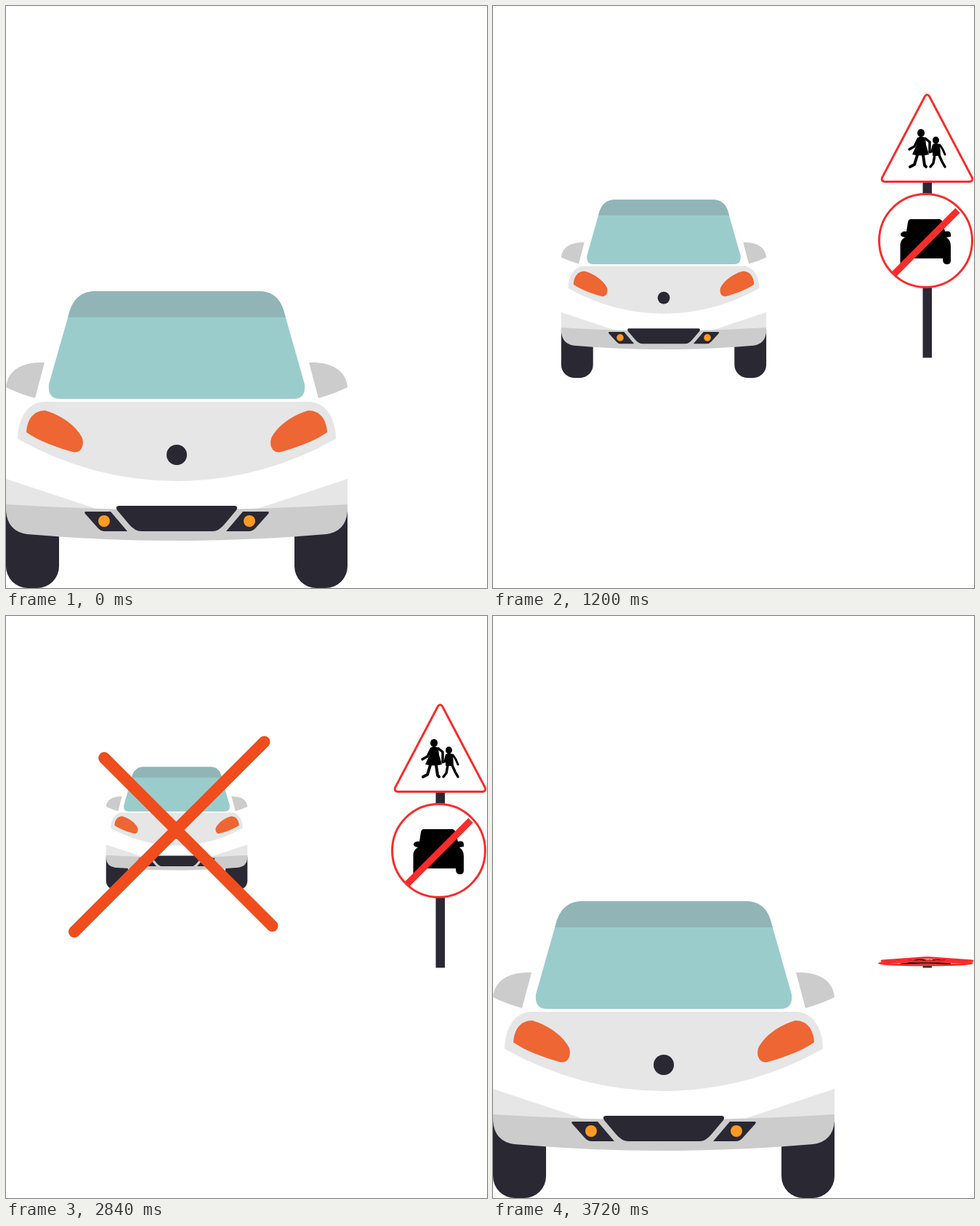
Write an HTML page that moves like this. It is 662 px wide and 800 px high and loops after 3760 ms.

```html
<!DOCTYPE html>
<html lang="en">
<head>
<meta charset="utf-8">
<title>No parking near the crossing</title>
<style>
  html, body { margin: 0; width: 100%; height: 100%; overflow: hidden; background: #fff; }
  svg { display: block; width: 100%; height: 100%; }
  .navy { fill: #292833; }
  .grey { fill: #ccc; }
  .pale { fill: #e6e6e6; }
  .glass { fill: #9bcccc; }
  .tint { fill: #91b5b7; }
  .lamp { fill: #ed6633; }
  .fog { fill: #ff9a22; }
  .limb { fill: none; stroke: #000; stroke-linecap: round; stroke-linejoin: round; }
  .rim { fill: #fff; stroke: #f92c2c; stroke-width: 3; vector-effect: non-scaling-stroke; }
  .cross { stroke: #ef4d1e; stroke-width: 16; stroke-linecap: round; }
</style>
</head>
<body>
<svg viewBox="0 0 662 800">
  <defs>
    <clipPath id="tintClip"><rect x="50" y="380" width="370" height="48"/></clipPath>
    <path id="screen" d="M121 392H350Q374 393 382 418L411 520Q413 540 396 540H74Q57 540 59 520L88 418Q97 393 121 392Z"/>
    <g id="side">
      <path class="navy" d="M0 690H73V770A30 30 0 0 1 43 800H30A30 30 0 0 1 0 770Z"/>
      <path class="grey" d="M0 524C2 502 20 489 53 490L40 539Q18 533 0 524Z"/>
      <path class="pale" d="M0 650L130 693H0Z"/>
    </g>
    <g id="lights">
      <path class="lamp" d="M28 586C29 568 38 556 54 556C78 563 97 578 105 594C108 605 103 614 94 613.500C70 607 45 598 28 586Z"/>
      <path class="navy" d="M110 695H144L167 722H136Q130 722 126 717L109 698Q107 695 110 695Z"/>
      <circle class="fog" cx="135" cy="708" r="8"/>
    </g>
  </defs>

  <g id="car">
    <use href="#side"/>
    <use href="#side" transform="matrix(-1 0 0 1 470 0)"/>
    <path class="grey" d="M0 685Q235 700 470 685V694Q468 722 441 726Q235 744 29 726Q2 722 0 694Z"/>
    <use href="#screen" class="glass"/>
    <use href="#screen" class="tint" clip-path="url(#tintClip)"/>
    <path class="pale" d="M52 544H418C442 545 454 570 454 595Q350 653 235 653T16 595C16 570 28 545 52 544Z"/>
    <use href="#lights"/>
    <use href="#lights" transform="matrix(-1 0 0 1 470 0)"/>
    <path class="navy" d="M155 687H315Q320 688 317 693L301 712Q293 722 284 722H187Q177 722 169 712L153 693Q150 688 155 687Z"/>
    <circle class="navy" cx="235" cy="617" r="14"/>
  </g>

  <g id="sign">
    <rect class="navy" x="591.500" y="230" width="12.500" height="253.500"/>
    <path class="rim" d="M594.500 124Q597.500 120 600.500 124L659.500 236Q661 241 656 241.500H539Q534 241 535.500 236Z"/>
    <circle class="rim" cx="595.500" cy="322.500" r="64"/>

    <ellipse cx="589" cy="174.500" rx="5" ry="5.500"/>
    <path d="M584 181Q589 178 595 181L596 191L600 204Q589 207 577 204L583 191Z"/>
    <path class="limb" stroke-width="3.500" d="M585 183L580 193L573 197M595 182L601 187L601 200"/>
    <path class="limb" stroke-width="4" d="M584 205L580 218L574 221M592 205L594 219L596 221"/>
    <ellipse cx="609.500" cy="184.500" rx="4.500" ry="5"/>
    <path d="M605 190Q610 188 615 190L616 206H605Z"/>
    <path class="limb" stroke-width="3" d="M606 192L604 200L601 201M615 191L619 197L622 204"/>
    <path class="limb" stroke-width="3.500" d="M608 205L606 216L602 221M614 205L618 214L622 221"/>

    <path d="M575 293H615Q618 294 619 298L622 310Q630 308 630 314L630 317L624 318Q630 322 630 330V350Q630 355 625 355H624Q619 355 619 347H573Q573 354 567 354H560.500V328Q561 321 567 318Q560 317 561 313Q564 309 569 310L571 297Q572 293 575 293Z"/>
    <path stroke="#f92c2c" stroke-width="9" d="M551.500 369L639.500 281"/>
  </g>

  <line class="cross" id="strokeA"/>
  <line class="cross" id="strokeB"/>
</svg>
<script>
  const LOOP = 3760, STEP = 40;
  const BASE_Y = 483.5;
  const byId = id => document.getElementById(id);
  const car = byId('car'), sign = byId('sign');

  // Linear interpolation through [time, value] keys.
  function track(keys, t) {
    if (t <= keys[0][0]) return keys[0][1];
    for (let i = 1; i < keys.length; i++) {
      const [t0, v0] = keys[i - 1], [t1, v1] = keys[i];
      if (t <= t1) return v0 + (v1 - v0) * (t - t0) / (t1 - t0);
    }
    return keys[keys.length - 1][1];
  }

  const carKeys = [[600, 1], [1480, 0.414], [3280, 0.414], [3560, 1]];
  const signKeys = [[120, 0], [320, 1.3], [480, 1], [3362, 1], [3521, 1.3], [3726, 0]];
  const strokes = [
    { el: byId('strokeA'), from: [94, 434], to: [355.5, 173],
      keys: [[1360, 0], [1660, 1], [3100, 1], [3400, 0]] },
    { el: byId('strokeB'), from: [366.5, 426], to: [99.5, 159.5],
      keys: [[1660, 0], [1960, 1], [2800, 1], [3100, 0]] }
  ];

  function drawStroke({ el, from, to, keys }, t) {
    const p = track(keys, t);
    el.style.display = p > 0 ? '' : 'none';
    el.setAttribute('x1', from[0]);
    el.setAttribute('y1', from[1]);
    el.setAttribute('x2', from[0] + (to[0] - from[0]) * p);
    el.setAttribute('y2', from[1] + (to[1] - from[1]) * p);
  }

  function render(t) {
    const size = track(carKeys, t), height = track(signKeys, t);
    car.setAttribute('transform', `translate(235 77) scale(${size}) translate(-235 -77)`);
    sign.style.display = height > 0 ? '' : 'none';
    sign.setAttribute('transform', `matrix(1 0 0 ${height} 0 ${BASE_Y * (1 - height)})`);
    strokes.forEach(s => drawStroke(s, t));
  }

  const start = performance.now();
  function tick() {
    const t = (performance.now() - start) % LOOP;
    render(Math.floor(t / STEP) * STEP);
    requestAnimationFrame(tick);
  }
  tick();
</script>
</body>
</html>
```
